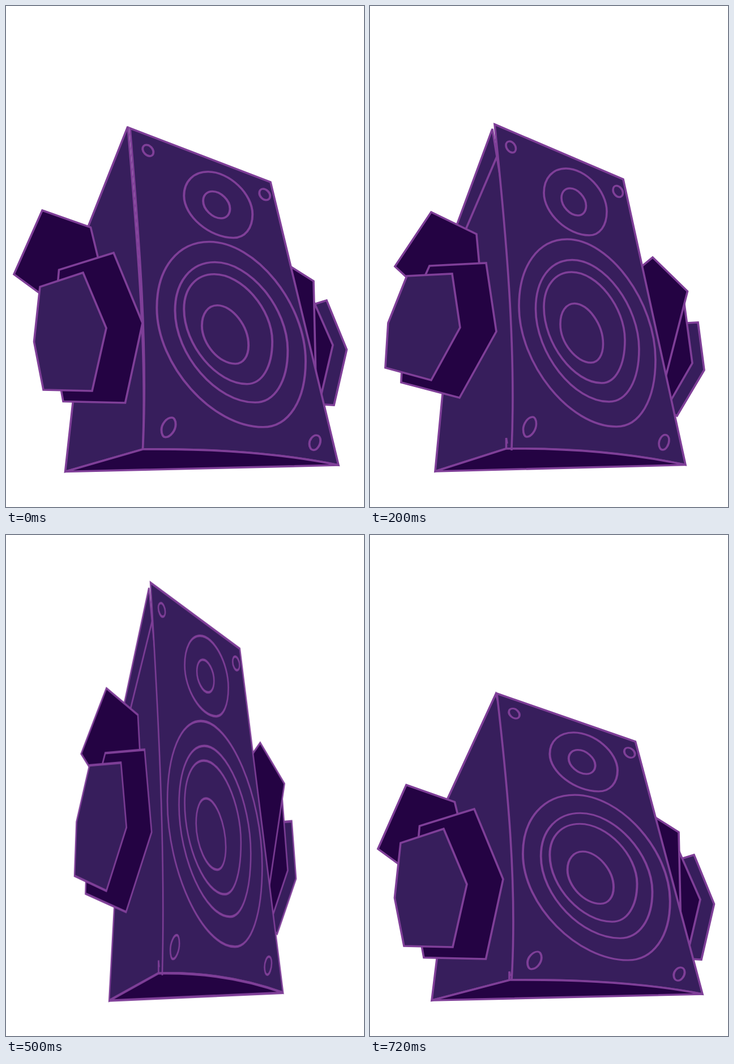
Animation, 632 px wide and 885 px high, one loop 0.8 s. Source, as an HTML page:

```html
<!DOCTYPE html>
<html lang="en">
<head>
<meta charset="utf-8">
<title>Bouncing speaker</title>
<style>
  html, body { margin: 0; width: 100%; height: 100%; overflow: hidden; background: #fff; }
  svg { display: block; width: 632px; height: 885px; }
  path { stroke: #7f3f98; stroke-width: 3.6; stroke-miterlimit: 3; fill: #371e5c; }
  .dark { fill: #240343; }
  .line, #rings path { fill: none; }
  .pose { animation: 800ms step-end infinite; }
  .wide { animation-name: wide; }
  .tall { animation-name: tall; }
  .squat { animation-name: squat; }
  @keyframes wide {
    0% { visibility: visible; }
    25%, 100% { visibility: hidden; }
  }
  @keyframes tall {
    0% { visibility: hidden; transform: none; }
    25% { visibility: visible; transform: none; }
    37.5% { visibility: visible; transform: matrix(.8515, 0, 0, 1.1215, 48.5, -99.2); }
    62.5% { visibility: visible; transform: matrix(.6945, 0, 0, 1.2045, 102.2, -167.7); }
    75%, 100% { visibility: hidden; transform: none; }
  }
  @keyframes squat {
    0% { visibility: hidden; }
    75%, 100% { visibility: visible; }
  }
</style>
</head>
<body>
<svg viewBox="0 0 632 885">
  <defs>
    <g id="rings"></g>
    <g id="right-hand">
      <path d="M540 528L566 520L601.5 607L579 705L545 703L530 600Z"/>
      <path class="dark" d="M538 510L577 599L552 706L520 600Z"/>
    </g>
    <path id="right-arm" class="dark" d="M480 446L543 486L547 660L500 600Z"/>
    <path id="left-arm" class="dark" d="M64 361L149.5 391L171 480L100 537L14 474Z"/>
    <g id="left-hand">
      <path class="dark" d="M190 436L241 560L210.5 701L101 698.5L82 594L93.5 466Z"/>
      <path d="M136 471L177 569L152 680L66 678L49.5 593L60 496Z"/>
    </g>
  </defs>

  <g class="pose wide">
    <use href="#right-hand"/>
    <use href="#right-arm"/>
    <path d="M215 213L133 420L140 500L125 636L118 701L104.5 822.5L241.5 783C249 600 230 400 215 213Z"/>
    <path d="M219 216L467 311L587 811C475 788 350 782 241.5 783C251 600 234 400 219 216Z"/>
    <path class="dark" d="M104.5 822.5L241.5 783C350 782 475 788 587 811Z"/>
    <use href="#rings" transform="matrix(1.09 0 0 .989 -20.4 9)"/>
    <use href="#left-arm"/>
    <use href="#left-hand"/>
  </g>

  <g class="pose tall">
    <path d="M540 561L579 559L590 643L542 724L525 715L520 600Z"/>
    <path class="dark" d="M551.5 501L569 631L528 702L500 650L520 520Z"/>
    <path class="dark" d="M499 444L560.5 504L522 655L480 600L470 468Z"/>
    <path d="M216 217L141 420L150 500L128 686L115 822L240 782H258L262 500L224 266Z"/>
    <path class="line" d="M224 266L165 404"/>
    <path d="M220 209L447 306L557 810.5C440 786 330 781 250 782C258 600 240 400 220 209Z"/>
    <path class="dark" d="M115 822L240 782C330 781 440 786 557 810.5Z"/>
    <path class="line" d="M240.5 782V763L242 773M250 780V785"/>
    <use href="#rings"/>
    <path class="dark" d="M108 364L188 403L197 500L100 512L44 460Z"/>
    <path class="dark" d="M105 459L205 454L223 575L158 692L55 665L60 560Z"/>
    <path d="M145 473L159 568L108 661L27 639L32 560L65 477Z"/>
  </g>

  <g class="pose squat">
    <use href="#right-hand" x="6" y="45"/>
    <use href="#right-arm" x="2" y="39"/>
    <path d="M222 281L130 481L125 560L123 700L118 749L109 822L247 786H258L262 560L228 300Z"/>
    <path d="M224 280L468.5 365L587 811C480 790 350 785 250 786C260 620 243 445 224 280Z"/>
    <path class="dark" d="M109 822L247 786C350 785 480 790 587 811Z"/>
    <path class="line" d="M246 786V771L247.5 779"/>
    <use href="#rings" transform="matrix(1.078 0 0 .882 -13.6 95.7)"/>
    <use href="#left-arm" y="80.5"/>
    <use href="#left-hand" x="-6" y="48"/>
  </g>
</svg>
<script>
  const rings = document.getElementById('rings');

  // Slanted oval through its left, top, right and bottom extremes
  function ring(left, top, right, bottom) {
    const [lx, ly] = left, [tx, ty] = top, [rx, ry] = right, [bx, by] = bottom;
    const lean = tx < bx ? .06 : -.06;
    const tight = .54 + lean, loose = .54 - lean;
    const mix = (a, b, k) => a + (b - a) * k;
    const path = document.createElementNS(rings.namespaceURI, 'path');
    path.setAttribute('d', `M${left}
      C${lx} ${mix(ly, ty, tight)} ${mix(tx, lx, tight)} ${ty} ${top}
      C${mix(tx, rx, loose)} ${ty} ${rx} ${mix(ry, ty, loose)} ${right}
      C${rx} ${mix(ry, by, tight)} ${mix(bx, rx, tight)} ${by} ${bottom}
      C${mix(bx, lx, loose)} ${by} ${lx} ${mix(ly, by, loose)} ${left}Z`);
    rings.append(path);
  }

  // Woofer
  ring([263, 530], [348, 412], [504, 625], [435, 743]);
  ring([292.5, 535], [357, 448.5], [475, 606], [422, 699]);
  ring([307, 532], [356, 470], [450, 590], [409, 666]);
  ring([336, 562], [361, 525.5], [411.5, 597], [390, 630]);
  // Tweeter
  ring([307, 330], [346, 287], [418, 363], [387, 405]);
  ring([338, 339], [353, 322], [381.5, 353], [367, 370]);
  // Screws
  ring([240, 246], [246.5, 239], [257.5, 252], [251.5, 259]);
  ring([429, 325], [435, 317.5], [446.5, 330], [440, 337.5]);
  ring([270.5, 748], [287, 726], [293.5, 738], [277, 761]);
  ring([510, 773], [521, 757.5], [528, 767], [517, 784]);
</script>
</body>
</html>
```
